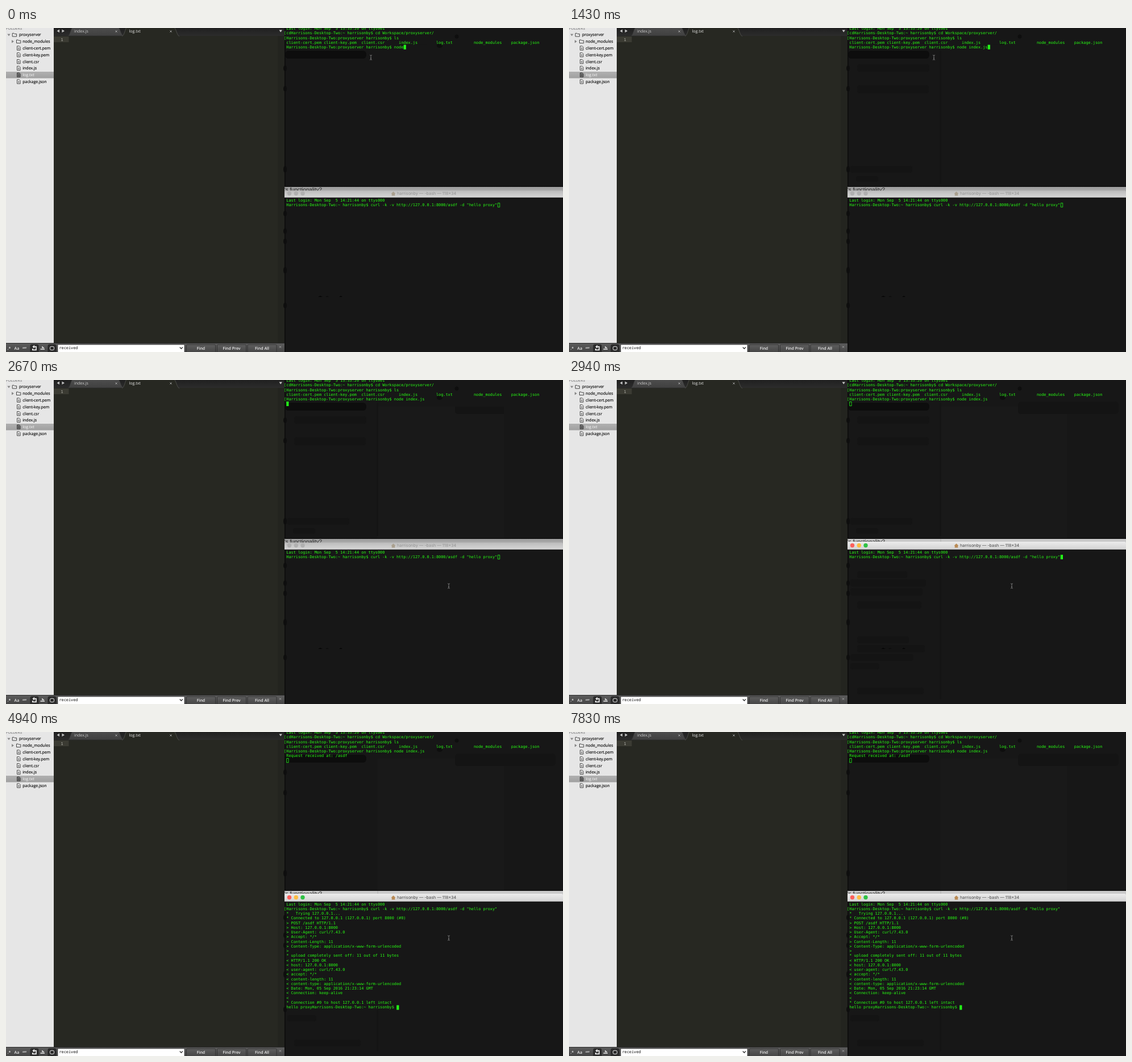
An HTML page for the animation above (8 s loop, 980 px wide and 571 px high).

```html
<!DOCTYPE html>
<html lang="en">
<head>
<meta charset="utf-8">
<title>Proxy server session</title>
<style>
html, body { margin: 0; width: 980px; height: 571px; overflow: hidden; background: #171717; }
svg, pre { position: absolute; left: 0; top: 0; margin: 0; text-rendering: geometricPrecision; }
pre, .mono { font: 6.852px/8.25px "DejaVu Sans Mono", monospace; color: #28fe14; white-space: pre; }
pre { left: 493.3px; }
#server { top: -2.9px; }
#request { top: 38.35px; }
#client { top: 299.7px; }
#reply { top: 316.2px; }
.ui { font: 7px "Open Sans", "Noto Sans", sans-serif; }
.bold { font-weight: 600; }
.files { stroke: #111; stroke-width: .15; }
.title { font: 7.3px Inter, Roboto, sans-serif; }
.strip { font: 9.7px "Liberation Sans", sans-serif; fill: #222; }
.term { fill: #28fe14; }
.hollow { fill: none; stroke: #23ff18; stroke-width: .8; }
.solid { fill: #23ff18; }
.smudge { fill: #141414; }

/* one shared 8 s clock, hard steps only */
.typing, .caret, .entered, .idle, .focus, .reply, .noreply, .waiting, .mouse,
.blink, .blink2, .ghost1, .ghost2 { animation: 8s step-end infinite; }
.typing { animation-name: typing; }
.caret { animation-name: caret; }
.entered { animation-name: entered; }
.idle { animation-name: idle; }
.focus { animation-name: focus; }
.reply { animation-name: reply; }
.noreply { animation-name: noreply; }
.waiting { animation-name: waiting; }
.mouse { animation-name: mouse; }
.blink { animation-name: blink; }
.blink2 { animation-name: blink2; }
.ghost1 { animation-name: ghost1; }
.ghost2 { animation-name: ghost2; }

@keyframes typing {
  0% { transform: translateX(0); opacity: 1; }
  3% { transform: translateX(8.25px); opacity: 1; }
  7.5% { transform: translateX(20.625px); opacity: 1; }
  10% { transform: translateX(24.75px); opacity: 1; }
  12.625% { transform: translateX(28.875px); opacity: 1; }
  15.25% { transform: translateX(33px); opacity: 1; }
  17.875% { transform: translateX(37.125px); opacity: 1; }
  22.625%, 100% { transform: translateX(37.125px); opacity: 0; }
}
@keyframes caret { 0% { opacity: 0; } 22.625% { opacity: 1; } 36.75%, 100% { opacity: 0; } }
@keyframes entered { 0% { opacity: 0; } 22.625%, 100% { opacity: 1; } }
@keyframes idle { 0% { opacity: 1; } 36.75%, 100% { opacity: 0; } }
@keyframes focus { 0% { opacity: 0; } 36.75%, 100% { opacity: 1; } }
@keyframes reply { 0% { opacity: 0; } 61.75%, 100% { opacity: 1; } }
@keyframes noreply { 0% { opacity: 0; } 36.75% { opacity: 1; } 61.75%, 100% { opacity: 0; } }
@keyframes waiting { 0% { opacity: 1; } 61.75%, 100% { opacity: 0; } }
@keyframes blink {
  0% { opacity: 0; } 36.75% { opacity: 1; } 42.75% { opacity: 0; }
  47.125% { opacity: 1; } 54.25%, 100% { opacity: 0; }
}
@keyframes blink2 {
  0% { opacity: 0; } 61.75% { opacity: 1; } 78.625% { opacity: 0; }
  85.625% { opacity: 1; } 90.875% { opacity: 0; } 97.875%, 100% { opacity: 1; }
}
@keyframes mouse {
  0% { transform: translate(642px, 52px); }
  25.125% { transform: translate(873px, 301px); }
  27.75% { transform: translate(865px, 320px); }
  30.75% { transform: translate(783px, 367px); }
  33.375%, 100% { transform: translate(779px, 363px); }
}
@keyframes ghost1 { 0% { opacity: 0; } 3% { opacity: 1; } 61.75%, 100% { opacity: 0; } }
@keyframes ghost2 { 0% { opacity: 0; } 25.125%, 100% { opacity: 1; } }
</style>
</head>
<body>
<svg width="980" height="571" viewBox="0 0 980 571">
  <defs>
    <linearGradient id="bar" x2="0" y2="1"><stop stop-color="#202020"/><stop offset="1" stop-color="#2c2c2c"/></linearGradient>
    <linearGradient id="tab" x2="0" y2="1"><stop stop-color="#4e4e4e"/><stop offset="1" stop-color="#404040"/></linearGradient>
    <linearGradient id="panel" x2="0" y2="1"><stop stop-color="#5e5e5e"/><stop offset="1" stop-color="#454545"/></linearGradient>
    <linearGradient id="row" x2="0" y2="1"><stop stop-color="#b0b0b0"/><stop offset="1" stop-color="#a0a0a0"/></linearGradient>
    <linearGradient id="on" x2="0" y2="1"><stop stop-color="#ebebeb"/><stop offset="1" stop-color="#d3d3d3"/></linearGradient>
    <linearGradient id="off" x2="0" y2="1"><stop stop-color="#bcbcbc"/><stop offset="1" stop-color="#d6d6d6"/></linearGradient>
    <linearGradient id="shade" x2="0" y2="1"><stop stop-color="#9c9c9c"/><stop offset="1" stop-color="#c4c4c4"/></linearGradient>
    <g id="file" stroke="#333" stroke-width=".9">
      <path d="M-2.7-3.6H1L2.8-1.8V3.6H-2.7Z"/><path d="M-1.3-.4H1.3M-1.3 1.5H1.3"/>
    </g>
    <path id="folder" d="M-3.8 3V-2.7H-1L0-1.6H3.6V3Z" fill="none" stroke="#333" stroke-width=".9"/>
    <path id="close" d="M-1.6-1.6L1.6 1.6M1.6-1.6L-1.6 1.6" stroke="#aaa" stroke-width=".9"/>
    <path id="house" d="M-4 0L0-3.7L4 0H2.8V3.6H-2.8V0Z"/>
    <g id="lights"><circle cx="498.5" cy="291.5" r="3.7"/><circle cx="510.3" cy="291.5" r="3.7"/><circle cx="522" cy="291.5" r="3.7"/></g>
  </defs>

  <!-- sidebar -->
  <path fill="#e6e6e6" d="M0 0H84V556H0Z"/>
  <path fill="url(#row)" d="M0 77H84V88.5H0Z"/>
  <g class="ui files" fill="#000">
    <text x="0" y="2.7" fill="#666" stroke="none" font-size="6.6">FOLDERS</text>
    <text x="23" y="14.4">proxyserver</text>
    <text x="29.3" y="26.2">node_modules</text>
    <text x="29.3" y="38">client-cert.pem</text>
    <text x="29.3" y="49.8">client-key.pem</text>
    <text x="29.3" y="61.6">client.csr</text>
    <text x="29.3" y="73.4">index.js</text>
    <text x="29.3" y="85.2" fill="#fff" stroke="none">log.txt</text>
    <text x="29.3" y="97">package.json</text>
  </g>
  <path fill="#888" d="M2.3 10.5H7.7L5 14.3ZM10 21V26.4L14 23.7Z"/>
  <use href="#folder" x="15" y="12"/><use href="#folder" x="22.3" y="23.7"/>
  <g fill="#f6f6f6">
    <use href="#file" x="22.3" y="35.5"/><use href="#file" x="22.3" y="47.3"/>
    <use href="#file" x="22.3" y="59.1"/><use href="#file" x="22.3" y="70.9"/>
    <use href="#file" x="22.3" y="82.7" fill="#777"/><use href="#file" x="22.3" y="94.5"/>
  </g>

  <!-- editor -->
  <path fill="#272822" d="M84 0H490V556H84Z"/>
  <path fill="#23241f" d="M478 14H490V556H478Z"/>
  <path fill="#3b3b33" d="M84 15H110.500V25H84Z"/>
  <path fill="url(#bar)" d="M84 0H490V14H84Z"/>
  <path fill="url(#tab)" stroke="#2a2a2a" stroke-width=".8" d="M108 14C113 13 113 1 118-2H197C202 1 202 13 208 14Z"/>
  <path fill="#272822" stroke="#5b5b57" stroke-width=".7" d="M204 14.500C209 13 209 1 213-2H295C300 1 300 13 305 14.500"/>
  <path fill="#c4c4c4" d="M94 2.500V8L89.500 5.200ZM98.500 2.500V8L103 5.200ZM480.500 3.500H486L483.200 7.500Z"/>
  <g class="ui" fill="#d0d0d0">
    <text x="120" y="8.400">index.js</text>
    <text x="216.500" y="8.400" fill="#eee">log.txt</text>
  </g>
  <use href="#close" x="194" y="6"/><use href="#close" x="290" y="6"/>
  <text class="mono" x="96.500" y="23" fill="#b5b5ac">1</text>

  <!-- find panel -->
  <path fill="url(#panel)" d="M0 555H490V571H0Z"/>
  <path fill="#2b2b2b" d="M0 555H490V556H0Z"/>
  <g fill="#2c2c2c" stroke="#202020" stroke-width=".8">
    <rect x="43" y="558" width="14" height="14" rx="2"/><rect x="74" y="558" width="14" height="14" rx="2"/>
  </g>
  <g class="ui bold" fill="#eee">
    <text class="bold" x="2.500" y="567">.*</text>
    <text class="bold" x="14.500" y="567">Aa</text>
    <text class="bold" x="29" y="568.500" font-size="9">“”</text>
  </g>
  <g fill="none" stroke="#eee" stroke-width="1.400">
    <path d="M46.800 565V567.300H53V561.700H48.500" stroke-width="1.700"/>
    <path d="M50 559.500L47.500 561.700L50 563.900"/>
    <path d="M60.500 566H68M64 561V563.500H67"/>
    <rect x="77.500" y="561.300" width="7" height="6.200" rx="2" stroke-width="1"/>
  </g>
  <path fill="#fff" stroke="#222" stroke-width=".6" d="M91 558H314V572H91Z"/>
  <text class="mono" x="93.500" y="566" fill="#111">received</text>
  <path d="M305.800 562.500L308.300 565.300L310.800 562.500" fill="none" stroke="#222" stroke-width="1.200"/>
  <g fill="url(#panel)" stroke="#2d2d2d" stroke-width=".8">
    <rect x="317.500" y="558" width="51" height="14" rx="1.500"/>
    <rect x="371.500" y="558" width="51" height="14" rx="1.500"/>
    <rect x="425" y="558" width="51" height="14" rx="1.500"/>
  </g>
  <g class="ui bold" fill="#f0f0f0" text-anchor="middle" style="font-weight:600">
    <text x="343" y="566.800">Find</text>
    <text x="397" y="566.800">Find Prev</text>
    <text x="450.500" y="566.800">Find All</text>
  </g>
  <use href="#close" x="482.500" y="562"/>

  <!-- terminals, with faint shapes showing through -->
  <path fill="#171717" d="M490 0H980V571H490Z"/>
  <path class="ghost2" fill="#191919" d="M654 47H876V280H654Z"/>
  <path fill="#0b0b0b" d="M490 0H491.500V571H490Z"/>
  <rect x="491" y="40" width="143" height="14" rx="6" fill="#0d0d0d"/>
  <g fill="#0e0e0e">
    <ellipse cx="763" cy="31" rx="5" ry="4"/><ellipse cx="793" cy="15" rx="3.500" ry="3.500"/>
    <ellipse cx="491" cy="71" rx="3" ry="5"/><ellipse cx="491" cy="107" rx="3" ry="5"/>
    <ellipse cx="491" cy="249" rx="3" ry="6"/><ellipse cx="491" cy="327" rx="3" ry="5"/>
    <ellipse cx="491" cy="358" rx="3" ry="5"/><ellipse cx="491" cy="376" rx="3" ry="5"/>
    <ellipse cx="491" cy="427" rx="3" ry="6"/><ellipse cx="491" cy="489" rx="3" ry="5"/>
  </g>
  <g class="smudge ghost1">
    <rect x="507" y="64" width="127" height="13" rx="4"/>
    <rect x="507" y="101" width="126" height="14" rx="4"/>
    <rect x="495" y="243" width="109" height="12" rx="4"/>
    <rect x="505" y="261" width="39" height="10" rx="4"/>
    <path d="M652.500 40H655V275H652.500Z"/>
  </g>
  <path class="smudge ghost2" d="M790 47H876V60H796Q790 60 790 54Z"/>
  <g class="smudge focus">
    <rect x="790" y="38" width="177" height="22" rx="6"/>
    <rect x="495" y="499" width="51" height="11" rx="4"/>
    <rect x="507" y="542" width="117" height="12" rx="4"/>
    <path d="M652.500 490H655V563H652.500Z"/>
  </g>
  <g class="smudge noreply">
    <rect x="507" y="337" width="88" height="12" rx="4"/>
    <rect x="495" y="351" width="133" height="13" rx="4"/>
    <rect x="495" y="367" width="127" height="13" rx="4"/>
    <rect x="507" y="390" width="113" height="13" rx="4"/>
    <rect x="507" y="452" width="91" height="12" rx="4"/>
    <rect x="507" y="467" width="119" height="13" rx="4"/>
    <rect x="495" y="483" width="111" height="12" rx="4"/>
    <path d="M652.500 299H655V490H652.500Z"/>
  </g>
  <path class="waiting" fill="#050505" d="M549 474L553 472L557 474ZM562 473.500L565 472.500L568 473.500ZM586 474L589 472L592 474Z"/>

  <!-- strip and title bar of the lower window -->
  <path fill="#080808" d="M490 279H980V280H490Z"/>
  <g class="idle">
    <path fill="url(#shade)" d="M490 280H980V298.500H490Z"/>
    <text class="strip" x="490" y="288">'s functionality?</text>
    <path fill="url(#off)" d="M490 298.500V289Q490 286.500 493 286.500H977Q980 286.500 980 289V298.500Z"/>
    <use href="#lights" fill="#b0b0b0"/>
    <use href="#house" x="681.500" y="292" fill="#aaa08f"/>
    <text class="title" x="688" y="294.200" fill="#929292">harrisonby — -bash — 118×34</text>
  </g>
  <g class="focus">
    <path fill="#c9c9c9" d="M490 280H980V298.500H490Z"/>
    <path fill="#aaa" d="M653.600 280H654.400V285H653.600Z"/>
    <text class="strip" x="490" y="288">'s functionality?</text>
    <path fill="url(#on)" d="M490 298.500V288Q490 285 493 285H977Q980 285 980 288V298.500Z"/>
    <circle cx="498.500" cy="291.500" r="3.700" fill="#fc605c"/>
    <circle cx="510.300" cy="291.500" r="3.700" fill="#fdbc40"/>
    <circle cx="522" cy="291.500" r="3.700" fill="#2fc244"/>
    <use href="#house" x="681.500" y="292" fill="#b98a55"/>
    <text class="title" x="688" y="294.200" fill="#444">harrisonby — -bash — 118×34</text>
  </g>
</svg>

<pre id="server">Last login: Mon Sep  5 13:53:20 on ttys001
cdHarrisons-Desktop-Two:~ harrisonby$ cd Workspace/proxyserver/
Harrisons-Desktop-Two:proxyserver harrisonby$ ls
client-cert.pem client-key.pem  client.csr      index.js        log.txt         node_modules    package.json
Harrisons-Desktop-Two:proxyserver harrisonby$ node index.js</pre>
<pre id="request" class="reply">Request received at: /asdf</pre>
<pre id="client">Last login: Mon Sep  5 14:21:44 on ttys000
Harrisons-Desktop-Two:~ harrisonby$ curl -k -v http://127.0.0.1:8000/asdf -d "hello proxy"</pre>
<pre id="reply" class="reply">*   Trying 127.0.0.1...
* Connected to 127.0.0.1 (127.0.0.1) port 8000 (#0)
&gt; POST /asdf HTTP/1.1
&gt; Host: 127.0.0.1:8000
&gt; User-Agent: curl/7.43.0
&gt; Accept: */*
&gt; Content-Length: 11
&gt; Content-Type: application/x-www-form-urlencoded
&gt;
* upload completely sent off: 11 out of 11 bytes
&lt; HTTP/1.1 200 OK
&lt; host: 127.0.0.1:8000
&lt; user-agent: curl/7.43.0
&lt; accept: */*
&lt; content-length: 11
&lt; content-type: application/x-www-form-urlencoded
&lt; Date: Mon, 05 Sep 2016 21:23:14 GMT
&lt; Connection: keep-alive
&lt;
* Connection #0 to host 127.0.0.1 left intact
hello proxyHarrisons-Desktop-Two:~ harrisonby$ </pre>

<svg width="980" height="571" viewBox="0 0 980 571">
  <g class="mono term">
    <text x="489" y="11.400">[</text>
    <text x="489" y="19.600">[</text>
    <text class="entered" x="489" y="36.100">[</text>
    <text class="reply" x="489" y="314">[</text>
  </g>
  <!-- the cover hides what is not typed yet -->
  <g class="typing">
    <path fill="#171717" d="M699.500 29.500H741V38H699.500Z"/>
    <path class="solid" d="M699.600 29.600H703.800V37.700H699.600Z"/>
  </g>
  <path class="caret solid" d="M493.300 37.900H497.400V46H493.300Z"/>
  <path class="noreply hollow" d="M493.700 38.300H497.100V45.600H493.700Z"/>
  <path class="reply hollow" d="M493.700 46.500H497.100V53.800H493.700Z"/>
  <path class="idle hollow" d="M865.300 308.500H868.700V315.700H865.300Z"/>
  <path class="blink solid" d="M864.800 308H869V316H864.800Z"/>
  <path class="blink2 solid" d="M687.200 481.500H691.400V489.600H687.200Z"/>
  <g class="mouse">
    <path d="M-2-4.200Q0-4.200 0-3Q0-4.200 2-4.200M0-3.200V3.200M-2 4.200Q0 4.200 0 3Q0 4.200 2 4.200M-1 1.200H1" fill="none" stroke="#999" stroke-width=".7"/>
  </g>
</svg>
</body>
</html>
```
